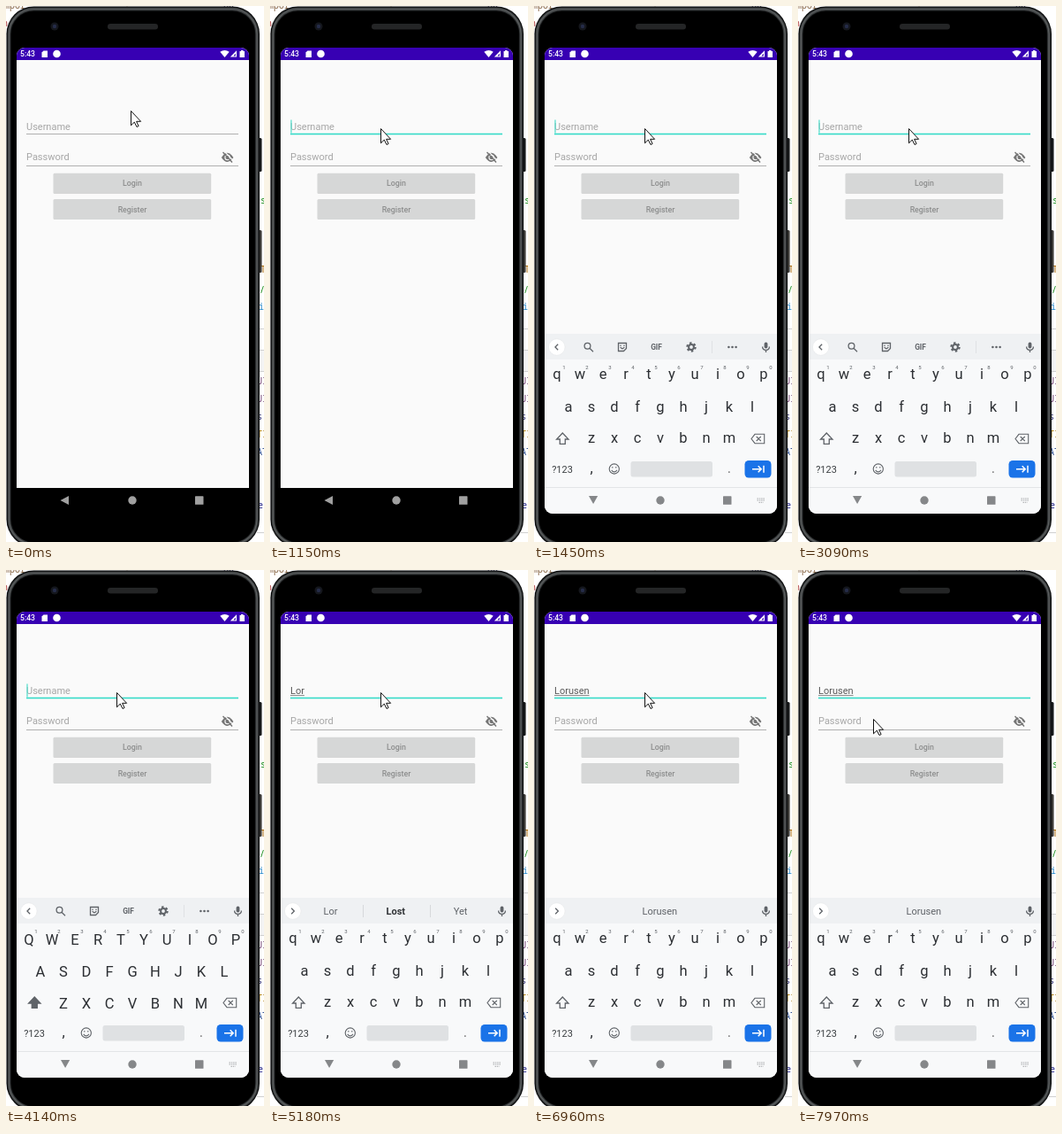
An HTML page for the animation above (8000 ms loop, 292 by 605 pixels).

```html
<!DOCTYPE html>
<html lang="en">
<head>
<meta charset="utf-8">
<title>Login form</title>
<style>
html, body { margin: 0; width: 100%; height: 100%; overflow: hidden; background: #fff; }
svg { display: block; width: 292px; height: 605px; }
text { font-family: Roboto, sans-serif; }
.mid { text-anchor: middle; }
.code { font: 10px "Noto Sans Mono", monospace; }
.field { font-size: 11px; }
.button { font-size: 8.8px; font-weight: 500; fill: #8c8d8d; }
.key { font-size: 16.5px; fill: #2c2f33; }
.digit { font-size: 6px; fill: #5f6368; }
.word { font-size: 11px; fill: #5f6368; }
.line { fill: none; stroke: #5f6368; stroke-width: 1.3; }
</style>
</head>
<body>
<svg viewBox="0 0 292 605">
  <defs>
    <clipPath id="screen"><rect x="12" y="47" width="263" height="526" rx="9"/></clipPath>
  </defs>
  <rect width="292" height="605" fill="#fff"/>
  <g id="editor">
    <rect x="284" y="388" width="8" height="24" fill="#f4f4f4"/>
    <path d="M284 364.5H292M284 388.5H292M284 412.5H292M284 594.5H292" stroke="#d0d0d0"/>
  </g>

  <!-- phone -->
  <rect x="285" y="149" width="4.5" height="38" rx="1.5" fill="#17191a"/>
  <rect x="285" y="253" width="4.5" height="48" rx="1.5" fill="#3b3936"/>
  <rect x=".5" y=".5" width="286.5" height="610" rx="31" fill="#0c0d0e"/>
  <rect x="3.5" y="3.5" width="280.5" height="604" rx="28" fill="none" stroke="#3b3e3f" stroke-width="3.4"/>
  <rect x="3.5" y="3.5" width="280.5" height="604" rx="28" fill="none" stroke="#5a5d5e" stroke-width="1.2"/>
  <rect x="6" y="6" width="275.5" height="599" rx="25.5" fill="#000"/>
  <circle cx="55" cy="23" r="4.5" fill="#15171d"/>
  <circle cx="55" cy="23" r="2.2" fill="#252c48"/>
  <rect x="115" y="20" width="57" height="6.5" rx="3.2" fill="#242526"/>

  <!-- app -->
  <g clip-path="url(#screen)">
    <rect x="12" y="47" width="263" height="497" fill="#fafafa"/>
    <rect x="12" y="47" width="263" height="14" fill="#3700b3"/>
  </g>
  <g fill="#fff">
    <text x="16" y="57" font-size="8.6" font-weight="500">5:43</text>
    <path d="M42.5 50.5H47V58H40.5V52.5Z"/>
    <circle cx="57.5" cy="54" r="4.3"/>
    <path d="M242.3 51.8Q247.5 48 252.7 51.8L247.5 58Z"/>
    <path d="M253.8 57.5H261V50.3Z"/>
    <path d="M264.5 51H266V50H268.5V51H270V58H264.5Z"/>
  </g>
  <path d="M257.5 56.4H259.8V53.4Z" fill="#3700b3"/>
  <text id="hint" class="field" x="23" y="139.8" fill="#a6a6a6">Username</text>
  <text id="name" class="field" x="23" y="139.8" fill="#5a5a5a"></text>
  <rect id="compose" x="23" y="141.2" height=".9" fill="#777"/>
  <rect id="rule" x="23" width="240"/>
  <rect id="caret" y="128.5" width="1.2" height="15" fill="#4fdccb"/>
  <text class="field" x="23" y="174.2" fill="#a6a6a6">Password</text>
  <rect x="23" y="180" width="240" height="1" fill="#b0b0b0"/>
  <path d="M243.8 171Q250.5 160.5 257.4 171Q250.5 181 243.8 171Z" fill="#757575"/>
  <circle cx="250.6" cy="171" r="2.7" fill="#757575" stroke="#fafafa" stroke-width="1.1"/>
  <path d="M247.3 164.2L257.6 175" stroke="#fafafa" stroke-width="1.2"/>
  <path d="M245.5 165L256 176.5" stroke="#757575" stroke-width="1.4"/>
  <g fill="#d6d7d7">
    <rect x="53.5" y="188.7" width="178.7" height="23.3" rx="1.5"/>
    <rect x="53.5" y="218" width="178.7" height="23" rx="1.5"/>
  </g>
  <text class="button mid" x="143" y="203.3">Login</text>
  <text class="button mid" x="143" y="232.6">Register</text>

  <g id="darkNav" fill="#a0a0a0">
    <path d="M61.5 558L71 553V563Z"/>
    <circle cx="143" cy="558" r="4.7"/>
    <rect x="214" y="553.3" width="9.5" height="9.5" rx=".6"/>
  </g>

  <g id="keyboard" clip-path="url(#screen)">
    <g id="panel">
      <rect x="12" y="370" width="263" height="203" fill="#f8f9fa"/>
      <rect x="12" y="370" width="263" height="29" fill="#eff1f3"/>
      <circle cx="25.8" cy="385" r="9.3" fill="#fff" stroke="#e4e6e8" stroke-width=".6"/>
      <path id="chevron" class="line"/>
      <g id="tools">
        <circle class="line" cx="60.5" cy="383.8" r="3.4"/>
        <path class="line" d="M63 386.3L67 390.3"/>
        <path class="line" d="M95.5 380.5H104.5V386.5L101.5 389.5H95.5ZM97.7 385Q100 388.5 102.3 385M98 382.7V384M102 382.7V384"/>
        <text class="mid" x="138.5" y="388" font-size="8.4" font-weight="700" fill="#5f6368">GIF</text>
        <circle class="line" cx="178" cy="385" r="4.6" stroke-dasharray="2.4" style="stroke-width:2.2"/>
        <circle class="line" cx="178" cy="385" r="2.9" style="stroke-width:2"/>
        <path d="M201.5 378V392" stroke="#dfe1e4"/>
        <g fill="#5f6368"><circle cx="220.4" cy="385" r="1.3"/><circle cx="224.5" cy="385" r="1.3"/><circle cx="228.6" cy="385" r="1.3"/></g>
      </g>
      <g id="words">
        <path id="bars" d="M105.5 378V392M181.5 378V392" stroke="#d6d8db"/>
        <text class="word mid" x="68.5" y="389"></text>
        <text class="word mid" x="142.3" y="389"></text>
        <text class="word mid" x="215.5" y="389"></text>
      </g>
      <rect x="260.6" y="379.5" width="3.8" height="7" rx="1.9" fill="#5f6368"/>
      <path class="line" d="M258.6 384.5Q258.6 388.3 262.5 388.3Q266.4 388.3 266.4 384.5M262.5 388.3V391"/>

      <g id="keys"></g>
      <path id="shift" class="line" d="M32.3 482L25.6 489H29.3V494.3H35.3V489H39Z"/>
      <path class="line" d="M250 483.3H260.7V493.7H250L246 488.5ZM251.7 486L256.8 491M256.8 486L251.7 491" style="stroke-width:1.1"/>
      <text class="mid" x="32" y="526.5" font-size="11" fill="#3c4043">?123</text>
      <text class="key mid" x="65" y="527">,</text>
      <circle class="line" cx="90.8" cy="522.5" r="5.6" style="stroke-width:1.1"/>
      <path class="line" d="M87.7 523.8Q90.8 528 93.9 523.8M88.8 520V521.5M92.8 520V521.5" style="stroke-width:1.1"/>
      <rect x="109.5" y="514" width="92.5" height="17.5" rx="2.5" fill="#dfe1e3"/>
      <text class="key mid" x="221" y="527" style="fill:#777">.</text>
      <rect x="238.5" y="513" width="30" height="19.5" rx="4.5" fill="#1a73e8"/>
      <path d="M247 522.7H257M253.7 519.2L257.2 522.7L253.7 526.2M260 518.7V526.7" fill="none" stroke="#fff" stroke-width="1.5"/>
    </g>
    <rect x="12" y="543" width="263" height="30" fill="#f8f9fa"/>
    <path d="M12 543.5H275" stroke="#e3e5e7"/>
    <g fill="#858789">
      <path d="M62 553H72.2L67.1 562Z"/>
      <circle cx="143" cy="558" r="4.7"/>
      <rect x="214" y="553.3" width="9.5" height="9.5" rx=".6"/>
    </g>
    <path d="M252.5 556H261.5M252.5 558H261.5M254.5 560.3H259.5" stroke="#a5a7a9" stroke-dasharray="1.5 .8"/>
  </g>

  <path id="mouse" d="M.5 .5V16.8L4.3 13.1L7 18.5L9.1 17.5L6.6 12.3H11.6Z" fill="#fff" stroke="#111"/>
</svg>

<script>
const $ = id => document.getElementById(id);
const LOOP = 8000;

// Each track is a list of [start ms, value]; a value holds until the next start.
const tracks = {
  mouse: [[0, [141, 118]], [150, [141, 122]], [270, [141, 126]], [430, [140, 126]], [570, [125, 138]],
    [7240, [120, 140]], [7390, [102, 152]], [7540, [101, 155]], [7660, [99, 158]], [7810, [85, 168]]],
  focus: [[0, false], [1000, true]],
  panel: [[0, null], [1300, 60], [1450, 0]],
  upper: [[0, false], [4020, true], [4290, false]],
  typed: [[0, 0], [4290, 1], [4610, 2], [4750, 3], [5740, 4], [6040, 5], [6160, 6], [6280, 7]],
  words: [[0, null], [4290, ["L", "Let", "The"]], [4610, ["Lo", "Love", "Low"]], [4750, ["Lor", "Lost", "Yet"]],
    [5740, ["Loru", "Lord", "Lure"]], [6040, ["Lorus", "Lotus", "Loud"]],
    [6160, ["Loruse", "Louse", "Loose"]], [6280, ["Lorusen", "Loosen", "Listen"]], [6400, ["", "Lorusen", ""]]]
};
const blink = [1000, 1570, 2160, 2560, 3090, 3590, 4140, 5180, 5740, 6960, 7390, 7970];
const NAME = "Lorusen";

function add(parent, cls, x, y, content, fill) {
  const el = document.createElementNS("http://www.w3.org/2000/svg", "text");
  el.setAttribute("class", cls);
  el.setAttribute("x", x);
  el.setAttribute("y", y);
  if (fill) el.setAttribute("fill", fill);
  el.textContent = content;
  return parent.appendChild(el);
}

const letters = [];
[["qwertyuiop", 26, 421], ["asdfghjkl", 39, 457.5], ["zxcvbnm", 65, 493.3]].forEach(([row, x0, y], r) => {
  [...row].forEach((ch, i) => {
    const x = x0 + i * 26;
    letters.push({ ch, y, el: add($("keys"), "key mid", x, y, ch) });
    if (!r) add($("keys"), "digit mid", x + 8, 409.5, (i + 1) % 10);
  });
});

[[-8, 3, "impor", "#864"], [128, 2, "-.", "#a86"], [155, 2, "-", "#a86"], [246, 3, "na", "#446"],
  [-4, 23, "n", "#a33"], [288, 223, "s", "#181"], [288, 301, "T", "#a60"], [287, 324, "/", "#181"],
  [286, 343, "i", "#28c"], [284, 427, "UI", "#636"], [284, 447, "UI", "#636"], [284, 467, "s", "#226"],
  [284, 487, "TI", "#a70"], [284, 507, "AT", "#248"], [285, 567, "e", "#228"]
].forEach(([x, y, s, color]) => add($("editor"), "code", x, y, s, color));

const at = (track, t) => track.reduce((v, [start, next]) => t >= start ? next : v, track[0][1]);
const show = (el, on) => el.setAttribute("visibility", on ? "inherit" : "hidden");
const set = (el, attrs) => { for (const k in attrs) el.setAttribute(k, attrs[k]); };
const wordEls = [...$("words").querySelectorAll("text")];

function draw(t) {
  const s = {};
  for (const k in tracks) s[k] = at(tracks[k], t);

  set($("mouse"), { transform: `translate(${s.mouse})` });
  set($("rule"), s.focus ? { y: 143.7, height: 1.6, fill: "#35dac8" } : { y: 144, height: 1, fill: "#b0b0b0" });

  $("name").textContent = NAME.slice(0, s.typed);
  const width = s.typed ? $("name").getComputedTextLength() : 0;
  show($("hint"), !s.typed);
  set($("compose"), { width });
  set($("caret"), { x: 23.4 + width });
  show($("caret"), blink.filter(b => t >= b).length % 2);

  const open = s.panel !== null;
  show($("keyboard"), open);
  show($("darkNav"), !open);
  set($("panel"), { transform: `translate(0 ${s.panel || 0})` });

  for (const { ch, y, el } of letters) {
    el.textContent = s.upper ? ch.toUpperCase() : ch;
    set(el, { y: s.upper ? y + 1.7 : y });
  }
  $("shift").style.fill = s.upper ? "#5f6368" : "none";

  show($("tools"), !s.words);
  show($("words"), s.words);
  set($("chevron"), { d: s.words ? "M24.2 381.8L27.4 385L24.2 388.2" : "M27.2 381.8L24 385L27.2 388.2" });
  if (s.words) {
    const several = s.words[0] !== "";
    show($("bars"), several);
    wordEls.forEach((el, i) => el.textContent = s.words[i]);
    wordEls[1].style.fontWeight = several ? 700 : 400;
    wordEls[1].style.fill = several ? "#303336" : "#5f6368";
  }
}

const start = performance.now();
function frame(now) {
  draw(Math.max(0, now - start) % LOOP);
  requestAnimationFrame(frame);
}
draw(0);
requestAnimationFrame(frame);
</script>
</body>
</html>
```
